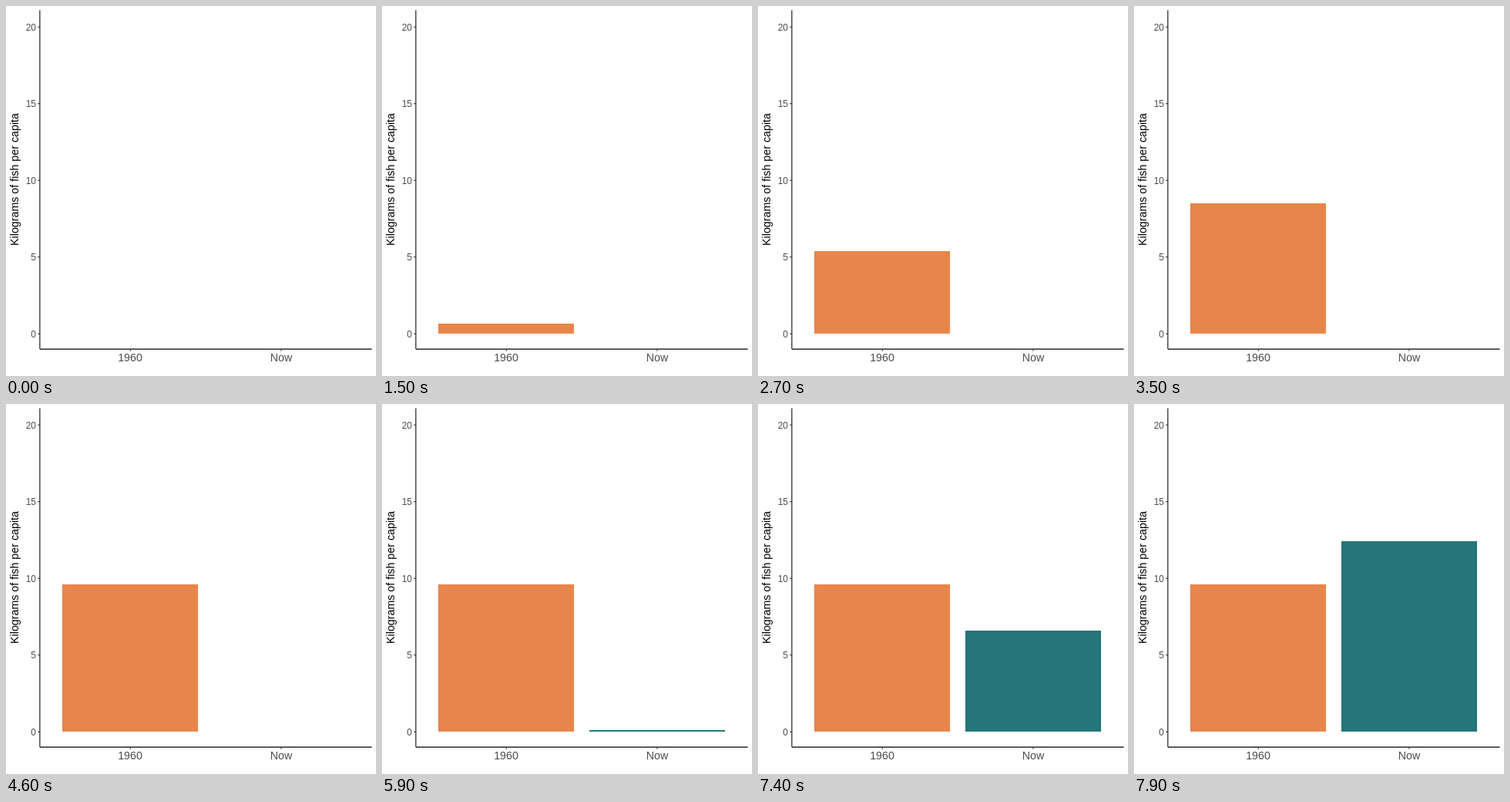
Recreate the animation shown at these times as an HTML page. Size 480 by 480 pixels, loop 8000 ms.

```html
<!DOCTYPE html>
<html lang="en">
<head>
<meta charset="utf-8">
<title>Fish per capita</title>
<style>
  html, body { margin: 0; width: 100%; height: 100%; overflow: hidden; background: #fff; }
  svg { display: block; width: 100vw; height: 100vh; }
  text { font: 14.25px "Liberation Sans", Arial, sans-serif; fill: #4d4d4d; text-anchor: middle; }
  .value { font-size: 12px; text-anchor: end; }
  .title { fill: #000; }
  path { fill: none; stroke: #333; stroke-width: 1.07; }
  .axis { stroke: #000; }
</style>
</head>
<body>
<svg viewBox="0 0 480 480">
  <rect id="then" x="73" width="176" fill="#e8854a"/>
  <rect id="now" x="269" width="176" fill="#257579"/>
  <g id="ticks"></g>
  <path class="axis" d="M43.9 5.5V445.1M43.9 445.1H474.5"/>
  <path d="M161.3 445.1v2.7M357 445.1v2.7"/>
  <text x="161" y="461">1960</text>
  <text x="357" y="461">Now</text>
  <text class="title" transform="translate(16 225) rotate(-90)">Kilograms of fish per capita</text>
</svg>
<script>
  const LOOP = 8000, STEP = 100, GROW = 4600;
  const BASE = 425.2, UNIT = 19.9;
  const bars = [
    { id: "then", start: 300, height: 191.1 },
    { id: "now", start: 5400, height: 399.6 }
  ];

  let ticks = "";
  for (let v = 0; v <= 20; v += 5) {
    const y = BASE - v * UNIT;
    ticks += `<path d="M41.2 ${y}h2.7"/><text class="value" x="39" y="${Math.round(y + 4.5)}">${v}</text>`;
  }
  document.getElementById("ticks").innerHTML = ticks;

  const cubicInOut = u => u < 0.5 ? 4 * u ** 3 : 1 - 4 * (1 - u) ** 3;

  function draw(time) {
    const t = Math.floor(time % LOOP / STEP) * STEP;
    for (const { id, start, height } of bars) {
      const u = Math.min(1, Math.max(0, (t - start) / GROW));
      const top = Math.round(BASE - height * cubicInOut(u));
      const rect = document.getElementById(id);
      rect.setAttribute("y", top);
      rect.setAttribute("height", Math.round(BASE) - top);
    }
  }

  function tick() {
    draw(performance.now());
    requestAnimationFrame(tick);
  }
  tick();
</script>
</body>
</html>
```
